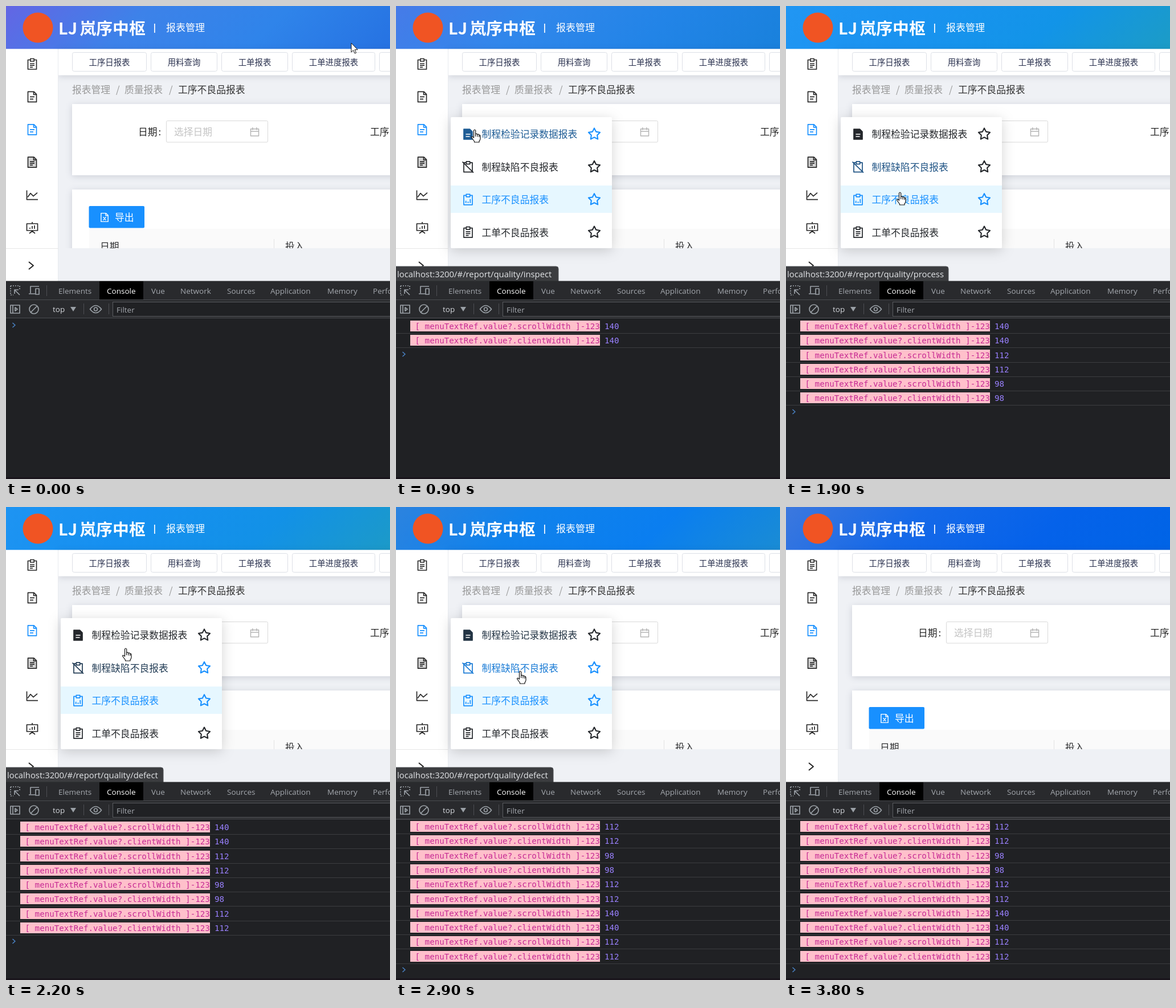
Animation of 674x830 px, one loop 3.9 s. Source, as an HTML page:

```html
<!DOCTYPE html>
<html lang="zh-CN">
<head>
<meta charset="utf-8">
<title>报表管理</title>
<style>
html, body { margin: 0; width: 674px; height: 830px; overflow: hidden; background: #202124; }
#head { position: absolute; left: 0; top: 0; width: 674px; height: 76px; }
svg { position: absolute; left: 0; top: 0; display: block; }
text { font-family: "Noto Sans CJK SC", "Noto Sans CJK", sans-serif; font-weight: 350; white-space: pre; }
.title { font-weight: 700; }
.ui { font-family: "Open Sans", "Noto Sans", sans-serif; font-weight: 400; }
.mono { font-family: "DejaVu Sans Mono", monospace; font-weight: 400; }
.card { fill: #fff; filter: drop-shadow(0 2px 6px rgba(30, 40, 70, .16)); }
.pop { fill: #fff; filter: drop-shadow(0 4px 11px rgba(0, 0, 0, .17)); }
</style>
</head>
<body>
<div id="head"></div>
<svg id="stage" width="674" height="830" viewBox="0 0 674 830"></svg>
<script>
const LOOP = 3900, STEP = 100, PITCH = 25.3;
const DARK = 0x24272b, BLUE = 0x1890ff;

// ---------- drawing helpers ----------
const text = (x, cy, size, str, fill, more = '') =>
  `<text x="${x}" y="${cy + size * .375}" font-size="${size}" fill="${fill}" ${more}>${str}</text>`;
const ui = (x, cy, str, fill, size = 13.5) =>
  text(x, cy, size, str, fill, 'class="ui"');
const rect = (x, y, w, h, fill, more = '') =>
  `<rect x="${x}" y="${y}" width="${w}" height="${h}" fill="${fill}" ${more}/>`;
const line = (d, color, width = 1) =>
  `<path d="${d}" fill="none" stroke="${color}" stroke-width="${width}" stroke-linejoin="round"/>`;
const icon = (name, x, y, color = '#2a2a2a', scale = 1) =>
  `<g transform="translate(${x} ${y}) scale(${scale})" color="${color}" fill="none" stroke="currentColor"
    stroke-width="1.7" stroke-linejoin="round">${ICONS[name]}</g>`;

const path = (d, more = '') => `<path d="${d}" ${more}/>`;
const DOC = 'M-7.5-9H3L7.5-4.5V9H-7.5Z';
const CLIP = 'M-3-7.5H-7.5V9H7.5V-7.5H3M-3.2-9.5H3.2V-5H-3.2Z';
const star = Array.from({ length: 10 }, (_, i) => {
  const r = i % 2 ? 5.4 : 10.6, a = i * Math.PI / 5;
  return `${(r * Math.sin(a)).toFixed(2)} ${(-r * Math.cos(a)).toFixed(2)}`;
}).join('L');

const ICONS = {
  clip: path(CLIP + 'M-4-1H4M-4 2.2H4M-4 5.4H1'),
  clipOff: path(CLIP + 'M-10-9L9.5 10'),
  clipBars: path(CLIP + 'M-3.8 6V2M0 6V3.5M3.8 6V-1'),
  doc: path(DOC + 'M2.5-9V-4H7.5M-4 0H4M-4 4H2'),
  docGrey: path(DOC, 'fill="#d4d4d4"') + path('M2.5-9V-4H7.5M-4-1H4M-4 2H4M-4 5H1'),
  docFull: path(DOC, 'fill="currentColor"') + path('M-4 0H4M-4 4H3', 'stroke="#fff"'),
  chart: path('M-9.5-8V8H10M-8 4L-3-3 2 2 9-4'),
  board: path('M-9.5-7H9.5V5H-9.5ZM0-10V-7M0 5V8M-5 10L0 6 5 10M-4 2V0M0 2V-3M4 2V-4'),
  sheet: path(DOC + 'M2.5-9V-4H7.5M-3-1L3 6M3-1L-3 6'),
  date: path('M-8-6H8V8H-8ZM-8-1H8M-4-9V-4M4-9V-4'),
  star: path(`M${star}Z`, 'stroke-width="2.1"'),
  inspect: path('M-8-8H8M-8-8V8', 'stroke-dasharray="2 2"') +
    path('M8-8V-2M-8 8H-3', 'stroke-dasharray="2 2"') + path('M8 8L-1-1M-1 6V-1H6'),
  device: path('M-6 5V-7H9M-9 6H2M3-3H9V7H3Z'),
  panel: path('M-8-7H8V7H-8ZM-4-7V7M0-3L4 0 0 3Z'),
  clear: path('M-8 0A8 8 0 1 0 8 0A8 8 0 1 0-8 0M5.5-5.5L-5.5 5.5'),
  eye: path('M-10 0Q0-13 10 0Q0 13-10 0ZM-3 0A3 3 0 1 0 3 0A3 3 0 1 0-3 0')
};

// ---------- static parts ----------
const header = () =>
  `<circle cx="56" cy="38" r="26.5" fill="#f05423"/>` +
  text(92, 39, 28.8, 'LJ <tspan x="129.5">岚序中枢</tspan>', '#fff', 'class="title"') +
  rect(260, 31, 1.7, 16, '#fff') +
  text(281, 38, 17, '报表管理', '#fff');

const tabs = [[116, 131, '工序日报表'], [254, 117, '用料查询'], [378, 117, '工单报表'],
  [502, 146, '工单进度报表'], [655, 100, '']];

const page = () =>
  rect(0, 75.5, 674, 407.5, '#eff1f5') +
  '<svg y="76" width="674" height="349" viewBox="0 76 674 349">' +
  rect(116, 172, 600, 125, '#fff', 'class="card"') +
  rect(116, 322, 600, 150, '#fff', 'class="card"') +
  rect(146, 391, 600, 60, '#fafafa') + rect(470, 409, 1, 30, '#e4e4e4') +
  text(165, 422, 16.8, '日期', '#303133') + text(490, 422, 16.8, '投入', '#303133') +
  '</svg>' +
  rect(92, 75.5, 620, 46, '#fff', 'class="card"') +
  tabs.map(([x, w, s]) =>
    rect(x + .5, 81.5, w - 1, 33, '#fff', 'rx="3" stroke="#dcdfe6"') +
    text(x + w / 2, 98.5, 14.4, s, '#2c3350', 'text-anchor="middle"')).join('') +
  text(116, 147, 16.8, '报表管理', '#999') + text(193, 147, 16.8, '/', '#999') +
  text(208, 147, 16.8, '质量报表', '#999') + text(286, 147, 16.8, '/', '#999') +
  text(302, 147, 16.8, '工序不良品报表', '#333') +
  text(232, 221, 16.8, '日期<tspan dx="2">:</tspan>', '#262626') +
  rect(281.5, 201.5, 178, 37.5, '#fff', 'rx="2" stroke="#d9d9d9"') +
  text(295, 221, 16.8, '选择日期', '#c4c4c4') + icon('date', 436.5, 221, '#b5b5b5', .88) +
  text(639, 221, 16.8, '工序', '#262626') +
  rect(145.5, 351, 97.5, 38.5, '#1890ff', 'rx="2"') + icon('sheet', 173, 371, '#fff', .82) +
  text(191, 371, 16.8, '导出', '#fff') +
  rect(0, 75.5, 91.5, 407.5, '#fff') + rect(91, 76, 1, 407, '#e8eaee') + rect(0, 425, 92, 1, '#e6e6e6') +
  ['clip', 'doc', 'doc', 'docGrey', 'chart', 'board'].map((n, i) =>
    icon(n, 46, 102 + 57.4 * i, i === 2 ? '#1890ff' : '#2a2a2a')).join('') +
  line('M40 449L48 455.5L40 462', '#222', 1.9);

const toolTabs = [[92, 'Elements'], [177, 'Console'], [255, 'Vue'], [306, 'Network'],
  [388, 'Sources'], [464, 'Application'], [564, 'Memory'], [644, 'Performance']];

const tools = () =>
  rect(0, 482.5, 674, 64.5, '#292a2d') + rect(164, 483, 77, 32, '#000') +
  rect(0, 515, 674, 1, '#4a4c50') + rect(0, 547, 674, 1, '#4a4c50') +
  [[71, 490], [136, 522], [180, 522]].map(([x, y]) => rect(x, y, 1, 19, '#4d4f53')).join('') +
  toolTabs.map(([x, s]) => ui(x, 499.5, s, s === 'Console' ? '#fff' : '#a4a8ae')).join('') +
  icon('inspect', 16, 499, '#9aa0a6') + icon('device', 49, 499, '#9aa0a6') +
  icon('panel', 16, 532, '#9aa0a6') + icon('clear', 49, 532, '#9aa0a6') +
  ui(82, 532, 'top', '#d5d8dc') + '<path d="M113 528H123L118 536Z" fill="#9aa0a6"/>' +
  icon('eye', 157.5, 532, '#9aa0a6') +
  rect(187.5, 519.5, 500, 25, '#202124', 'stroke="#5a5c60"') + ui(194, 533, 'Filter', '#a4a8ae');

// ---------- console log ----------
const log = [[140, 900], [112, 1200], [98, 1700], [112, 2100], [140, 2300], [112, 2700]]
  .flatMap(([value, at]) => ['scrollWidth', 'clientWidth'].map(prop => ({ value, at, prop })));

// Each row is drawn around y = 0 and placed on whole pixels by draw().
const logRow = ({ value, prop }) =>
  `<g>${rect(25, -10, 333, 19, '#ffc0cb')}` +
  text(25, -.4, 14.18, ` [ menuTextRef.value?.${prop} ]-123`, '#c62a94', 'class="mono"') +
  text(366, -.4, 14.18, value, '#9980ff', 'class="mono"') +
  rect(0, 12, 674, 1, '#3c3d40') + '</g>';

const consoleBody = () =>
  rect(0, 548, 674, 282, '#202124') +
  '<svg y="548" width="674" height="282" viewBox="0 548 674 282">' +
  `<g id="rows">${log.map(logRow).join('')}</g>` +
  `<g id="prompt">${line('M11.5-4L16 0L11.5 4', '#4a84c8', 1.5)}</g></svg>` +
  rect(0, 827, 674, 3, '#19151c');

// ---------- pop-up menu ----------
const items = [['docFull', '制程检验记录数据报表'], ['clipOff', '制程缺陷不良报表'],
  ['clipBars', '工序不良品报表'], ['clip', '工单不良品报表']];

const menu = () =>
  `<g id="menu">${rect(96, 195, 283, 230, '#fff', 'class="pop" rx="2"')}` +
  rect(96, 315, 283, 48, '#e6f7ff') +
  items.map(([n, s], i) => {
    const y = 225 + 57.4 * i;
    return `<g class="item">${icon(n, 126.5, y, 'inherit')}` +
      text(150.5, y, 16.8, s, 'currentColor') + '</g>' +
      `<g class="star">${icon('star', 348, y, 'inherit')}</g>`;
  }).join('') + '</g>';

const overlay = () =>
  `<g id="status">${rect(-5, 457, 281, 31, '#3b3c3f', 'id="bar" rx="4" stroke="#55575b"')}` +
  ui(2, 470.5, '', '#e3e5e8', 14.85) + '</g>';

const cursors = () =>
  `<path id="arrow" d="M0 0V16L3.7 12.6L6.2 18.2L8.6 17.1L6.2 11.7H11.2Z" fill="#fff" stroke="#111"/>
  <path id="hand" d="M-3.5 3V-9.5Q-2-12.5-.3-9.5V-3Q1.3-5 3-2.5Q4.8-4 6-1.4Q7.5-2.5 8 0V5Q7.5 8 6 9V11H-2.5V9.5
  L-7.5 2.5Q-7-.3-3.5 3ZM-.3-3V1M3-2.5V1.5M6-1.4V2" fill="#fff" stroke="#111" stroke-width="1.2" stroke-linejoin="round"/>`;

const $ = id => document.getElementById(id);
$('stage').innerHTML = header() + page() + menu() + consoleBody() + overlay() + tools() + cursors();

// ---------- motion ----------
// Linear track over keys [time, ...values].
function track(keys, t) {
  let i = 0;
  while (i < keys.length - 2 && t >= keys[i + 1][0]) i++;
  const [t0, ...a] = keys[i], [t1, ...b] = keys[i + 1];
  const k = Math.min(1, Math.max(0, (t - t0) / (t1 - t0)));
  return a.map((v, n) => v + (b[n] - v) * k);
}
const rgb = c => [c >> 16, c >> 8 & 255, c & 255];
const mix = (a, b, k) => {
  const B = rgb(b);
  return `rgb(${rgb(a).map((v, i) => Math.round(v + (B[i] - v) * k))})`;
};

const sky = [
  [0, 0x6366e4, 0x3d82e9, 0x2f84ea, 0x2672e2],
  [500, 0x5570e8, 0x3a87ea, 0x2b82e9, 0x1f74e5],
  [1200, 0x3a84e8, 0x2a87ec, 0x1c86e6, 0x158ad6],
  [1900, 0x2196f3, 0x1a93f0, 0x1294e8, 0x1c9cc6],
  [2200, 0x1e94f2, 0x1690f0, 0x1291e7, 0x1c9ac8],
  [2900, 0x2c83df, 0x1082ec, 0x0a7ef0, 0x1a8cd4],
  [3800, 0x3c78de, 0x1569e8, 0x0562ea, 0x0064e6]
].map(([t, ...cs]) => [t, ...cs.flatMap(rgb)]);

const pointer = [[0, 606, 65], [100, 570, 85], [200, 430, 160], [300, 180, 222], [400, 55, 230],
  [500, 43, 228], [700, 43, 228], [900, 140, 228], [1000, 165, 238], [1200, 187, 288],
  [1400, 188, 290], [1700, 200, 335], [1900, 202, 338], [2000, 204, 325], [2200, 212, 259],
  [2400, 213, 236], [2600, 214, 245], [2800, 219, 290], [2900, 220, 299], [3100, 222, 301],
  [3400, 650, 400], [3500, 720, 420]];

const popup = [[300, 0], [400, .6], [500, .96], [600, 1], [3200, 1], [3400, 0]];
const tint = [
  [[800, 0], [1000, 1], [1100, 1], [1200, .85], [1400, 0], [2300, 0], [2500, 1], [2700, 1], [2900, .12], [3000, 0]],
  [[1200, 0], [1500, 1], [1700, 1], [1900, .42], [2000, 0], [2100, 0], [2200, .2], [2400, 0], [2600, 0],
    [2900, .8], [3000, 1], [3100, 1], [3400, 0]]
];
const starOn = [[[900, 1300], [2300, 2700]], [[1300, 1800], [2200, 2300], [2700, 3200]]];
const links = [[800, 'inspect', 285], [1200, 'defect', 276], [1700, 'process', 285],
  [2100, 'defect', 276], [2300, 'inspect', 285], [2700, 'defect', 276]];

const show = (el, on) => el.style.display = on ? '' : 'none';
const itemEls = document.querySelectorAll('.item'), starEls = document.querySelectorAll('.star');
const rowEls = [...$('rows').children], urlEl = $('status').querySelector('text');

function draw(t) {
  const c = track(sky, t).map(Math.round);
  const stops = [0, 3, 6, 9].map(i => `rgb(${c.slice(i, i + 3)})`);
  $('head').style.background = `linear-gradient(135deg, ${stops})`;

  const [open] = track(popup, t), s = .8 + .2 * open;
  show($('menu'), open > 0);
  $('menu').setAttribute('opacity', open);
  $('menu').setAttribute('transform', `translate(96 195) scale(${s}) translate(-96 -195)`);
  items.forEach((_, i) => {
    const chosen = i === 2;
    const k = chosen ? 1 : tint[i] ? track(tint[i], t)[0] : 0;
    const lit = chosen || (starOn[i] || []).some(([a, b]) => t >= a && t < b);
    itemEls[i].style.color = mix(DARK, BLUE, k);
    starEls[i].style.color = mix(DARK, BLUE, lit ? 1 : 0);
  });

  const count = log.filter(r => r.at <= t).length;
  const scroll = count > 10 ? 51.5 : 0;
  const place = (el, y) => el.setAttribute('transform', `translate(0 ${Math.round(y - scroll)})`);
  rowEls.forEach((el, i) => {
    show(el, i < count);
    place(el, 561.9 + PITCH * i);
  });
  place($('prompt'), 560 + PITCH * count);

  const link = links.filter(l => l[0] <= t).pop();
  show($('status'), link && t < 3400);
  if (link) {
    urlEl.textContent = 'localhost:3200/#/report/quality/' + link[1];
    $('bar').setAttribute('width', link[2] + 5);
  }

  const [x, y] = track(pointer, t), onLink = t >= 400 && t < 3200;
  show($('hand'), onLink);
  show($('arrow'), !onLink && t < 3500);
  for (const id of ['hand', 'arrow']) $(id).setAttribute('transform', `translate(${x} ${y})`);
}

const start = performance.now();
function tick() {
  const t = (performance.now() - start) % LOOP;
  draw(Math.floor(t / STEP) * STEP);
  requestAnimationFrame(tick);
}
draw(0);
requestAnimationFrame(tick);
</script>
</body>
</html>
```
